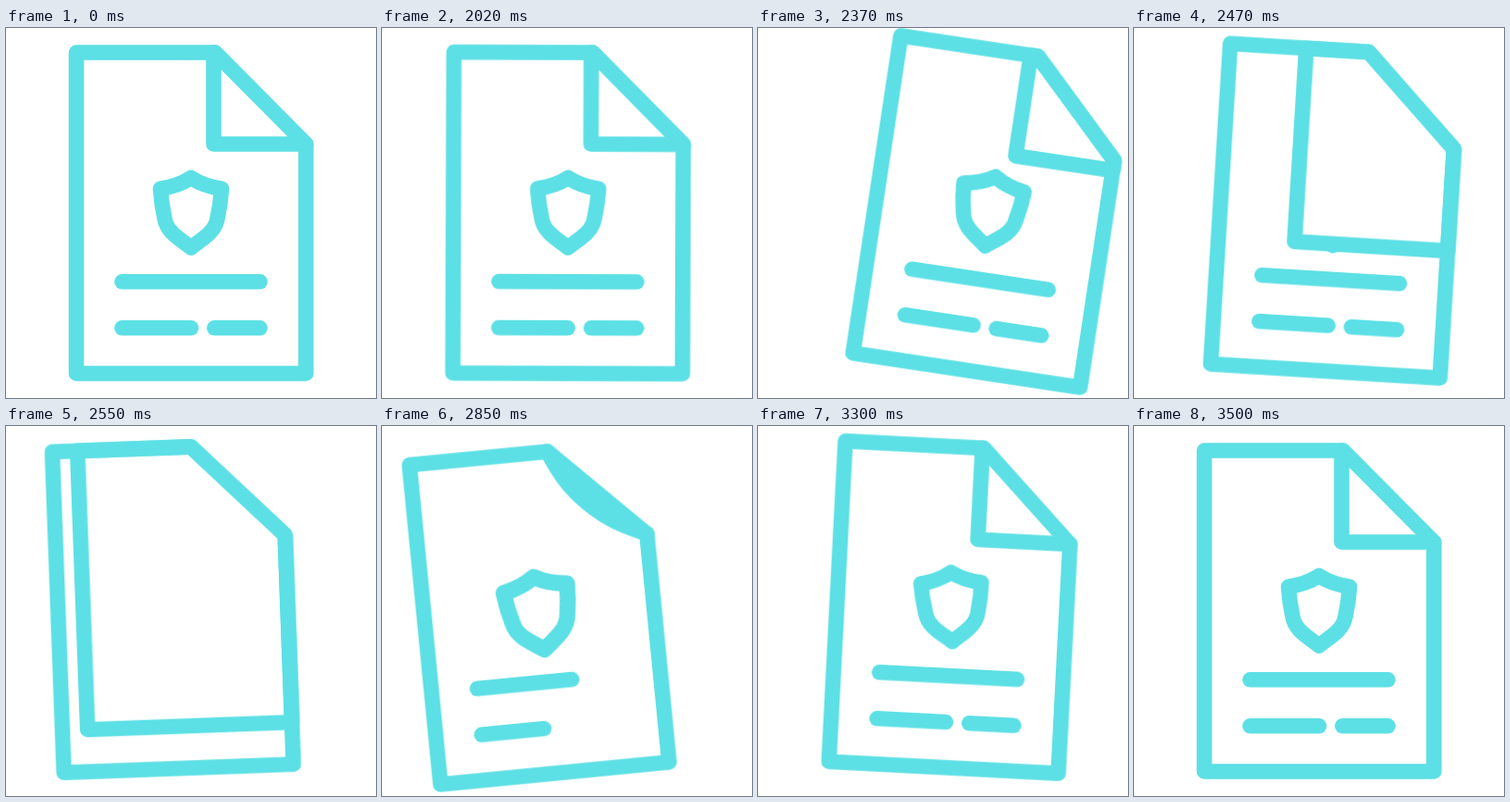
Recreate the animation shown at these times as an HTML page without scripts. Size 400 by 400 pixels, loop 3520 ms.

```html
<!DOCTYPE html>
<html lang="en">
<head>
<meta charset="utf-8">
<title>Document page turn</title>
<style>
  html, body { margin: 0; width: 100%; height: 100%; overflow: hidden; background: #fff; }
  svg { display: block; width: 100vw; height: 100vh; }

  .page, .shield { transform-origin: 200px 200px; }
  .page, .page * { animation: 3520ms linear infinite; }
  .page {
    fill: none; stroke: #5ce0e5; stroke-width: 16.6;
    stroke-linecap: round; stroke-linejoin: round;
    animation-name: sway;
  }
  .shield { animation-name: pop; }
  .line { stroke-dasharray: 100 300; }
  .title { animation-name: write-title; }
  .left { animation-name: write-left; }
  .right { animation-name: write-right; }
  .sheet { fill: #fff; animation-name: peel, sheet-shown; }
  .fold { animation-name: curl, fold-shown; }

  @keyframes sway {
    0%, 56.82% { transform: none; animation-timing-function: cubic-bezier(.22, 0, .67, 1); }
    66.34% { transform: translate(54px, -1.5px) rotate(9deg); animation-timing-function: cubic-bezier(.42, 0, .75, .75); }
    72.44% { transform: translate(-19.5px, -3.3px) rotate(-2deg); animation-timing-function: cubic-bezier(.15, .45, .5, 1); }
    77.84% { transform: translate(-36px, 4px) rotate(-6.9deg); animation-timing-function: cubic-bezier(.5, 0, .55, 1); }
    89.77% { transform: translate(15px, -6.5px) rotate(4.7deg); animation-timing-function: cubic-bezier(.33, 0, .67, 1); }
    99.43%, 100% { transform: none; }
  }

  /* The folded corner sweeps over the whole page and wipes it clean. */
  @keyframes peel {
    0%, 66.28% {
      d: path("M224.5 26.5 V125.5 H324.3 V125.5 L226 26.5 Z");
      animation-timing-function: cubic-bezier(.33, 0, .63, 1);
    }
    75%, 100% { d: path("M76 26.5 V373.5 H324.3 V125.5 L226 26.5 Z"); }
  }
  @keyframes sheet-shown {
    0%, 75% { opacity: 1; }
    75.01%, 100% { opacity: 0; }
  }

  /* A new corner bends out of the diagonal edge. */
  @keyframes curl {
    0%, 75.77% {
      d: path("M226 26.5 C240 41 250 51 275 76 C300 101 310 111 324.3 125.5");
      animation-timing-function: cubic-bezier(.33, 0, .67, 1);
    }
    93.18%, 100% { d: path("M224.5 26.5 C224.5 90 224.5 125.5 224.5 125.5 C224.5 125.5 260 125.5 324.3 125.5"); }
  }
  @keyframes fold-shown {
    0%, 75% { opacity: 0; }
    75.01%, 100% { opacity: 1; }
  }

  @keyframes pop {
    0%, 74.9% { transform: none; }
    74.91%, 75.2% { transform: scale(0); animation-timing-function: ease-out; }
    79.55% { transform: rotate(0deg) scale(1.08); animation-timing-function: ease-in; }
    80.97% { transform: rotate(-3deg) scale(1.05); }
    86.93% { transform: rotate(-14deg) scale(.97); }
    88.07% { transform: rotate(-14deg) scale(.97); animation-timing-function: ease-in-out; }
    97.2%, 100% { transform: none; }
  }

  @keyframes write-title {
    0%, 74.9% { stroke-dashoffset: 0; }
    74.91%, 75.2% { stroke-dashoffset: 101; animation-timing-function: cubic-bezier(.215, .61, .355, 1); }
    93.84%, 100% { stroke-dashoffset: 0; }
  }
  @keyframes write-left {
    0%, 74.9% { stroke-dashoffset: 0; }
    74.91%, 75.3% { stroke-dashoffset: 101; animation-timing-function: cubic-bezier(.215, .61, .355, 1); }
    85.51%, 100% { stroke-dashoffset: 0; }
  }
  @keyframes write-right {
    0%, 74.9% { stroke-dashoffset: 0; }
    74.91%, 83.24% { stroke-dashoffset: 101; animation-timing-function: cubic-bezier(.25, .46, .45, .94); }
    95.17%, 100% { stroke-dashoffset: 0; }
  }
</style>
</head>
<body>
<svg viewBox="0 0 400 400">
  <g class="page">
    <path class="shield" d="M200 162 Q186 171 167 173.7 Q168 190 171.5 206 C174 221 188 228 200 237.5 C212 228 226 221 228.5 206 Q232 190 233 173.7 Q214 171 200 162 Z"/>
    <path class="line title" pathLength="100" d="M125.5 274.3 H274.5"/>
    <path class="line left" pathLength="100" d="M125.5 324.3 H200"/>
    <path class="line right" pathLength="100" d="M225.3 324.3 H274.5"/>
    <path class="sheet" d="M224.5 26.5 V125.5 H324.3 V125.5 L226 26.5 Z"/>
    <path class="fold" d="M226 26.5 C240 41 250 51 275 76 C300 101 310 111 324.3 125.5"/>
    <path d="M76 26.5 H226 L324.3 125.5 V373.5 H76 Z"/>
  </g>
</svg>
</body>
</html>
```
